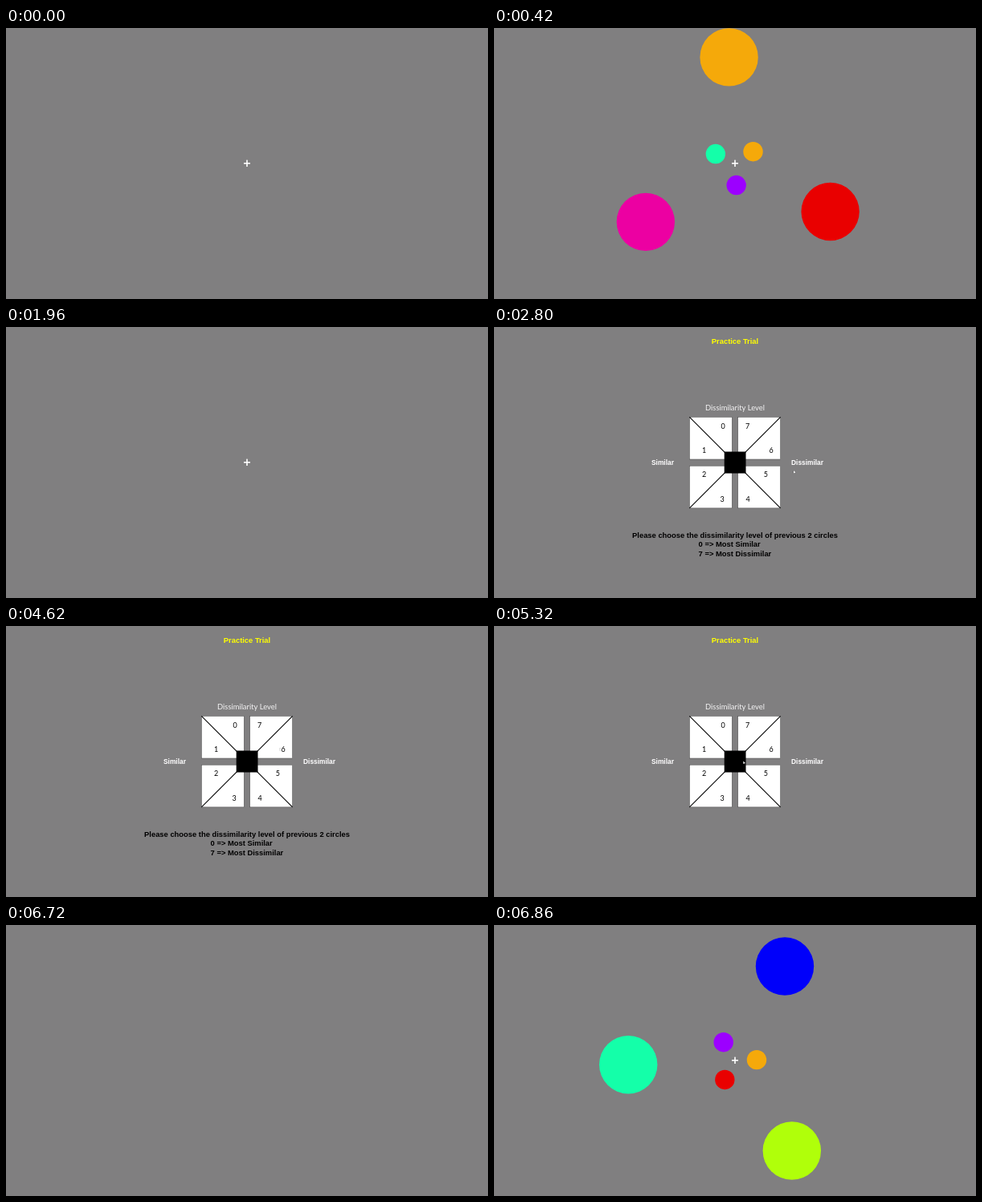
These frames come from a looping animation (600 px wide and 338 px high, 8 s). An HTML page with a canvas:

```html
<!DOCTYPE html>
<html lang="en">
<head>
<meta charset="utf-8">
<style>
  html, body { margin: 0; height: 100%; overflow: hidden; background: #807f80; }
  canvas { display: block; }
</style>
</head>
<body>
<canvas id="stage" width="600" height="338"></canvas>
<script>
const ctx = document.getElementById('stage').getContext('2d');
const LOOP = 8000, STEP = 140;
const CX = 300, CY = 169.1;
const BOLD = '700 9.38px "Liberation Sans", Arial, sans-serif';
const LABEL = '700 8.4px "Liberation Sans", Arial, sans-serif';
const LATO = 'Lato, "Open Sans", sans-serif';
const ORANGE = '#f5a90a', RED = '#e90000', MAGENTA = '#ec00a2', MINT = '#14ffa9',
      PURPLE = '#9c00ff', BLUE = '#0000fa', LIME = '#b0ff0a';

// Pointer key points: [time, x, y]
const pointerKeys = [
  [3500, 373, 179], [3780, 350, 176], [4060, 332, 145], [4200, 332, 145],
  [4480, 341, 152], [4760, 341, 152], [5040, 314, 171], [5740, 305, 165]
];

function text(str, x, y, font, color, align = 'center') {
  ctx.font = font;
  ctx.fillStyle = color;
  ctx.textAlign = align;
  ctx.fillText(str, x, y);
}

function cross() {
  ctx.fillStyle = '#fff';
  ctx.fillRect(296, 168, 8, 1.6);
  ctx.fillRect(299.2, 164.6, 1.6, 8.4);
}

// Three discs 120 degrees apart around the centre
function ring(distance, radius, phase, colors) {
  colors.forEach((color, i) => {
    const angle = (phase + 120 * i) * Math.PI / 180;
    ctx.fillStyle = color;
    ctx.beginPath();
    ctx.arc(CX + distance * Math.cos(angle), CY + distance * Math.sin(angle),
            radius, 0, 2 * Math.PI);
    ctx.fill();
  });
}

function circles(outerPhase, outerColors, innerPhase, innerColors) {
  ring(132.9, 36.2, outerPhase, outerColors);
  ring(27, 12.2, innerPhase, innerColors);
  cross();
}

function pointer(time) {
  const t = Math.max(pointerKeys[0][0], Math.floor(time / STEP) * STEP);
  const next = pointerKeys.findIndex(key => key[0] > t);
  const b = pointerKeys.at(next), a = next > 0 ? pointerKeys[next - 1] : b;
  const k = a === b ? 0 : (t - a[0]) / (b[0] - a[0]);
  const x = a[1] + (b[1] - a[1]) * k, y = a[2] + (b[2] - a[2]) * k;
  ctx.beginPath();
  ctx.moveTo(x, y);
  ctx.lineTo(x + 2.5, y + 2.5);
  ctx.lineTo(x, y + 3.5);
  ctx.closePath();
  ctx.strokeStyle = 'rgba(0,0,0,.4)';
  ctx.lineWidth = 0.5;
  ctx.stroke();
  ctx.fillStyle = '#fff';
  ctx.fill();
}

// One quarter of the answer pad; sx and sy give its side of the centre
function panel(sx, sy) {
  const x = CX + sx * 3.7, y = CY + sy * 4.1;
  const w = sx * 52.9, h = sy * 52.7;
  ctx.fillStyle = '#fff';
  ctx.fillRect(x, y, w, h);
  ctx.strokeStyle = '#444';
  ctx.lineWidth = 0.5;
  ctx.strokeRect(x, y, w, h);
  ctx.beginPath();
  ctx.moveTo(x + w, y + h);
  ctx.lineTo(CX, CY);
  ctx.strokeStyle = '#000';
  ctx.lineWidth = 1.1;
  ctx.stroke();
}

function rating(asking) {
  text('Practice Trial', CX, 20.7, BOLD, '#ff0');
  text('Dissimilarity Level', CX, 104.2, '9.4px ' + LATO, '#f4f4f4');
  text('Similar', 196, 172, LABEL, '#fff', 'left');
  text('Dissimilar', 370, 172, LABEL, '#fff', 'left');

  for (const sx of [-1, 1]) for (const sy of [-1, 1]) panel(sx, sy);
  ctx.fillStyle = '#000';
  ctx.fillRect(286.7, 155.5, 26.8, 27);

  const digitX = [285, 261.7, 261.5, 284, 316, 338.3, 345.2, 315.5];
  digitX.forEach((x, i) => {
    const far = (i + 1) % 4 < 2, below = i > 1 && i < 6;
    const y = CY + (far ? 45.5 : 15) * (below ? 1 : -1);
    text(i, x, y + 3, '9px ' + LATO, '#000');
  });

  if (!asking) return;
  text('Please choose the dissimilarity level of previous 2 circles', CX, 263, BOLD, '#000');
  text('0 => Most Similar', 254.6, 274.3, BOLD, '#000', 'left');
  text('7 => Most Dissimilar', 254.6, 285.6, BOLD, '#000', 'left');
}

function draw(t) {
  ctx.fillStyle = '#807f80';
  ctx.fillRect(0, 0, 600, 338);
  if (t < 280) cross();
  else if (t < 420) return;
  else if (t < 1820) circles(26.8, [RED, MAGENTA, ORANGE], 86.5, [PURPLE, MINT, ORANGE]);
  else if (t < 2800) cross();
  else if (t < 6020) {
    if (t < 5740) rating(t < 4760);
    pointer(t);
  }
  else if (t < 6720) cross();
  else if (t >= 6860) circles(57.8, [LIME, MINT, BLUE], 118, [RED, PURPLE, ORANGE]);
}

const start = performance.now();
function tick() {
  draw((performance.now() - start) % LOOP);
  requestAnimationFrame(tick);
}
tick();
</script>
</body>
</html>
```
